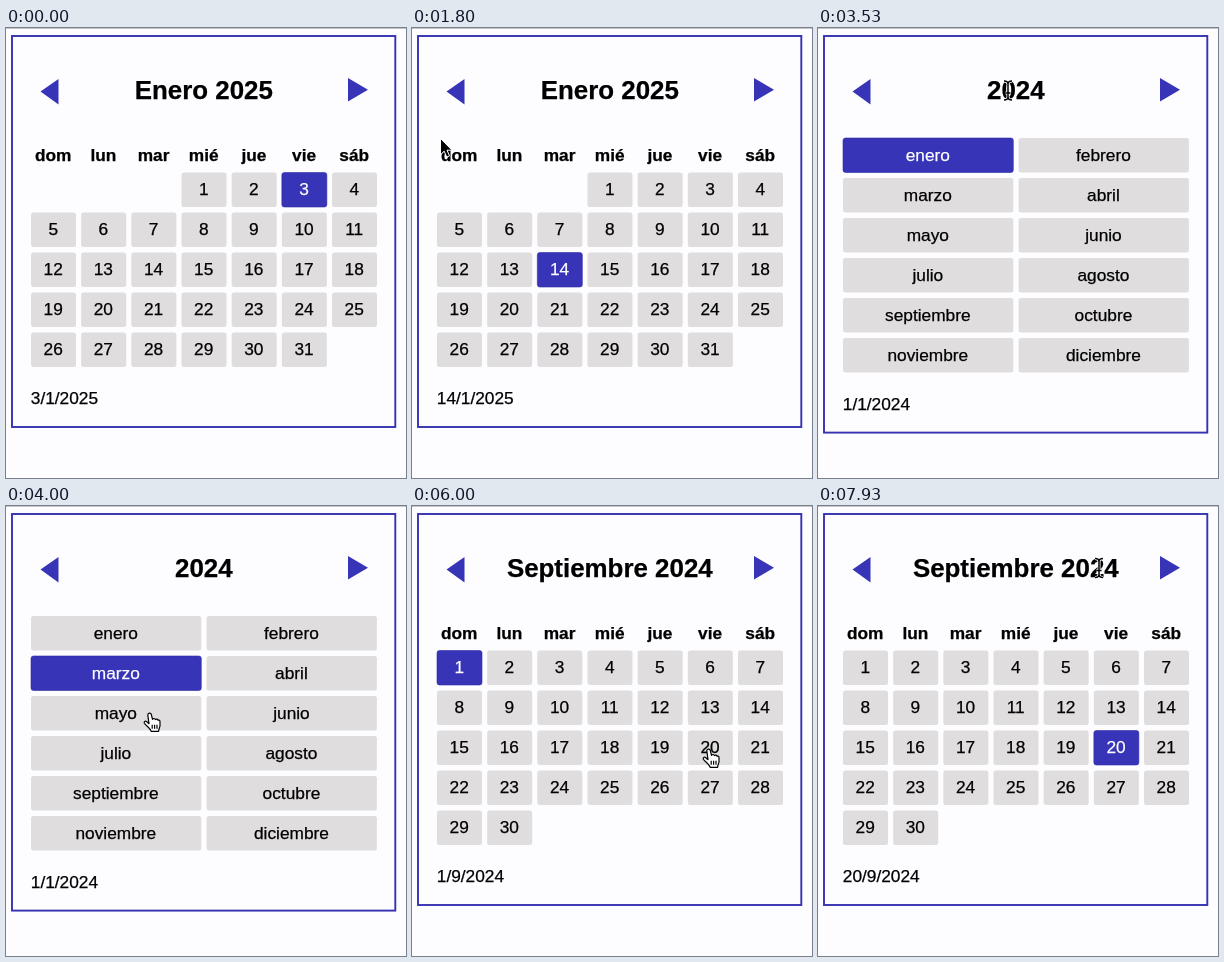
These frames come from a looping animation (400 by 450 pixels, 8000 ms). An HTML page:

```html
<!DOCTYPE html>
<html lang="es">
<head>
<meta charset="utf-8">
<title>Calendario</title>
<style>
  html, body { margin: 0; width: 100%; height: 100%; overflow: hidden; background: #fdfcff; }
  svg { display: block; width: 400px; height: 450px; font: 17.3px "Liberation Sans", Arial, sans-serif; }
  text { stroke: #000; stroke-width: .25; }
  .mid { text-anchor: middle; }
  .bold { font-weight: bold; }
  .title { font-size: 25.9px; }
  .cell { fill: #e0dddf; }
  .on { fill: #3734b7; stroke: #2f2ca6; stroke-width: .6; }
  .on + text { fill: #fff; stroke: #fff; }
  .accent { fill: #3734b7; }
  .card { fill: none; stroke: #3532b2; stroke-width: 1.9; }
  #hand { fill: #fff; stroke: #000; stroke-width: 1.2; stroke-linejoin: round; }
  #arrow { fill: #000; stroke: #fff; stroke-width: 1; }
  #beam { fill: none; stroke: #000; stroke-width: 1.5; }
  #beam .halo { stroke: #fff; stroke-width: 3; }
</style>
</head>
<body>
<svg viewBox="0 0 400 450">
  <defs>
    <path id="bar" d="M-4-9Q0-9 0-6Q0-9 4-9M0-6V7M-4 10Q0 10 0 7Q0 10 4 10M-2.5 3H2.5"/>
  </defs>
  <rect width="400" height="1" fill="#c6c4c8"/>
  <rect class="card" id="card" x="6" y="8" width="383.3" height="391"/>
  <path class="accent" d="M34.5 63.5L52.5 51V76.5ZM342 50V73.5L362 61.8Z"/>
  <text class="mid bold title" id="title" x="197.8" y="71.2"></text>
  <g id="grid"></g>
  <text id="date" x="24.8"></text>
  <g id="cursor">
    <path id="arrow" d="M0 0V16.2L3.7 12.7L6.2 18.6L9 17.4L6.5 11.7H11.5Z"/>
    <g id="hand" transform="translate(-1.2 -.8)">
      <path d="M-2 1.2C-2-1 1-1.2 1.5.8L2.7 5.6C3.5 4.4 5.2 4.6 5.6 6C6.6 5 8 5.4 8.3 6.6C9.4 6 10.2 6.8 10.2 8V12C10 14 9 15 8.8 17.6H1.4C1 15.4-2.8 12.6-5.4 9.6C-6.4 8-4.4 6.8-3 8L-.8 10Z"/>
      <path d="M2.4 11v4M4.8 11v4M7.2 11v4"/>
    </g>
    <g id="beam"><use href="#bar" class="halo"/><use href="#bar"/></g>
  </g>
</svg>
<script>
const LOOP = 8000, HOVER_LAG = 60;
const SHOW_CURSOR = 1470, PREV_MONTH = 2400, OPEN_YEAR = 3200, PICK_MONTH = 4730, PICK_DAY = 6200;
const PICKED_MONTH = 8, PICKED_DAY = 20;
const PITCH_X = 50.17, PITCH_Y = 40, CELL_H = 34.5;

const $ = id => document.getElementById(id);
const clamp = (v, lo, hi) => Math.max(lo, Math.min(hi, v));
const ease = u => u * u * (3 - 2 * u);
const range = n => Array.from({ length: n }, (_, i) => i);

// Names come from the calendar itself
const format = (date, options) => date.toLocaleDateString('es', options);
const MONTHS = range(12).map(m => format(new Date(2024, m, 1), { month: 'long' }));
const DAYS = range(7).map(d => format(new Date(2024, 8, d + 1), { weekday: 'short' }));

// Pointer rests: where it stops, when it arrives and when it leaves
const STOPS = [
  { x: 8, y: 300, from: SHOW_CURSOR, to: SHOW_CURSOR },
  { x: 28.5, y: 110.5, from: 1800, to: 1800 },
  { x: 46, y: 65.5, from: 2250, to: 2680 },
  { x: 190, y: 62, from: 3070, to: 3820 },
  { x: 145, y: 208.5, from: 4000, to: 4000 },
  { x: 157, y: 283.5, from: 4600, to: 4850 },
  { x: 298, y: 244.5, from: 5600, to: 6450 },
  { x: 320, y: 235, from: 7100, to: 7300 },
  { x: 281, y: 61.5, from: 7700, to: LOOP }
];

let cells = [], shown = '';

function pointAt(t) {
  const i = STOPS.findIndex(s => t <= s.to), b = STOPS[i], a = STOPS[i - 1];
  if (!a || t >= b.from) return b;
  const e = ease((t - a.to) / (b.from - a.to));
  return { x: a.x + (b.x - a.x) * e, y: a.y + (b.y - a.y) * e };
}

// Arrow keys: two rows down, then three days left
function keyedDay(t) {
  const down = (t >= 330) + (t >= 600);
  const left = clamp(Math.floor((t - 670) / 200), 0, 3);
  return 3 + 7 * down - left;
}

function viewAt(t) {
  if (t < PREV_MONTH) return { year: 2025, month: 0, day: keyedDay(t) };
  if (t < OPEN_YEAR) return { year: 2024, month: 11, day: 1 };
  if (t < PICK_MONTH) return { year: 2024, month: 0, day: 1, whole: true, hover: hoveredMonth(t) };
  return { year: 2024, month: PICKED_MONTH, day: t < PICK_DAY ? 1 : PICKED_DAY };
}

function hoveredMonth(t) {
  const row = Math.floor((pointAt(t - HOVER_LAG).y - 107) / PITCH_Y);
  return 2 * clamp(row, 0, 5);
}

function addCell(x, y, w, label, on) {
  cells.push({ x, y, w });
  return `<rect class="cell ${on ? 'on' : ''}" x="${x}" y="${y}" width="${w}" height="${CELL_H}" rx="2.5"/>` +
    `<text class="mid" x="${x + w / 2 - .3}" y="${y + 22.5}">${label}</text>`;
}

function monthGrid({ year, month, day }) {
  const first = new Date(year, month, 1).getDay();
  const count = new Date(year, month + 1, 0).getDate();
  const head = DAYS.map((d, i) =>
    `<text class="mid bold" x="${47.2 + i * PITCH_X}" y="132.7">${d}</text>`);
  const days = range(count).map(i => {
    const n = first + i;
    return addCell(25 + n % 7 * PITCH_X, 144.5 + Math.floor(n / 7) * PITCH_Y, 45, i + 1, i + 1 === day);
  });
  return head.concat(days).join('');
}

function yearGrid({ hover }) {
  return MONTHS.map((m, i) =>
    addCell(25 + i % 2 * 175.6, 110 + Math.floor(i / 2) * PITCH_Y, 170.3, m, i === hover)).join('');
}

function showView(t) {
  const view = viewAt(t), key = JSON.stringify(view);
  if (key === shown) return;
  shown = key;
  cells = [];
  const { year, month, day, whole } = view, name = MONTHS[month];
  $('title').textContent = whole ? year : `${name[0].toUpperCase()}${name.slice(1)} ${year}`;
  $('grid').innerHTML = whole ? yearGrid(view) : monthGrid(view);
  $('date').textContent = `${day}/${month + 1}/${year}`;
  $('date').setAttribute('y', whole ? 381.6 : 376.1);
  $('card').setAttribute('height', whole ? 396.6 : 391);
}

function cursorKind({ x, y }) {
  const dx = Math.abs(x - 198);
  if (y > 48 && y < 78) {
    if (dx < $('title').getComputedTextLength() / 2) return 'beam';
    if (dx > 143 && dx < 165) return 'hand';
  }
  const over = c => x > c.x && x < c.x + c.w && y > c.y && y < c.y + CELL_H;
  return cells.some(over) ? 'hand' : 'arrow';
}

function showCursor(t) {
  const p = pointAt(t), kind = cursorKind(p);
  $('cursor').style.display = t < SHOW_CURSOR ? 'none' : '';
  $('cursor').setAttribute('transform', `translate(${p.x} ${p.y})`);
  for (const k of ['arrow', 'hand', 'beam']) $(k).style.display = k === kind ? '' : 'none';
}

function frame() {
  const t = performance.now() % LOOP;
  showView(t);
  showCursor(t);
  requestAnimationFrame(frame);
}
frame();
</script>
</body>
</html>
```
